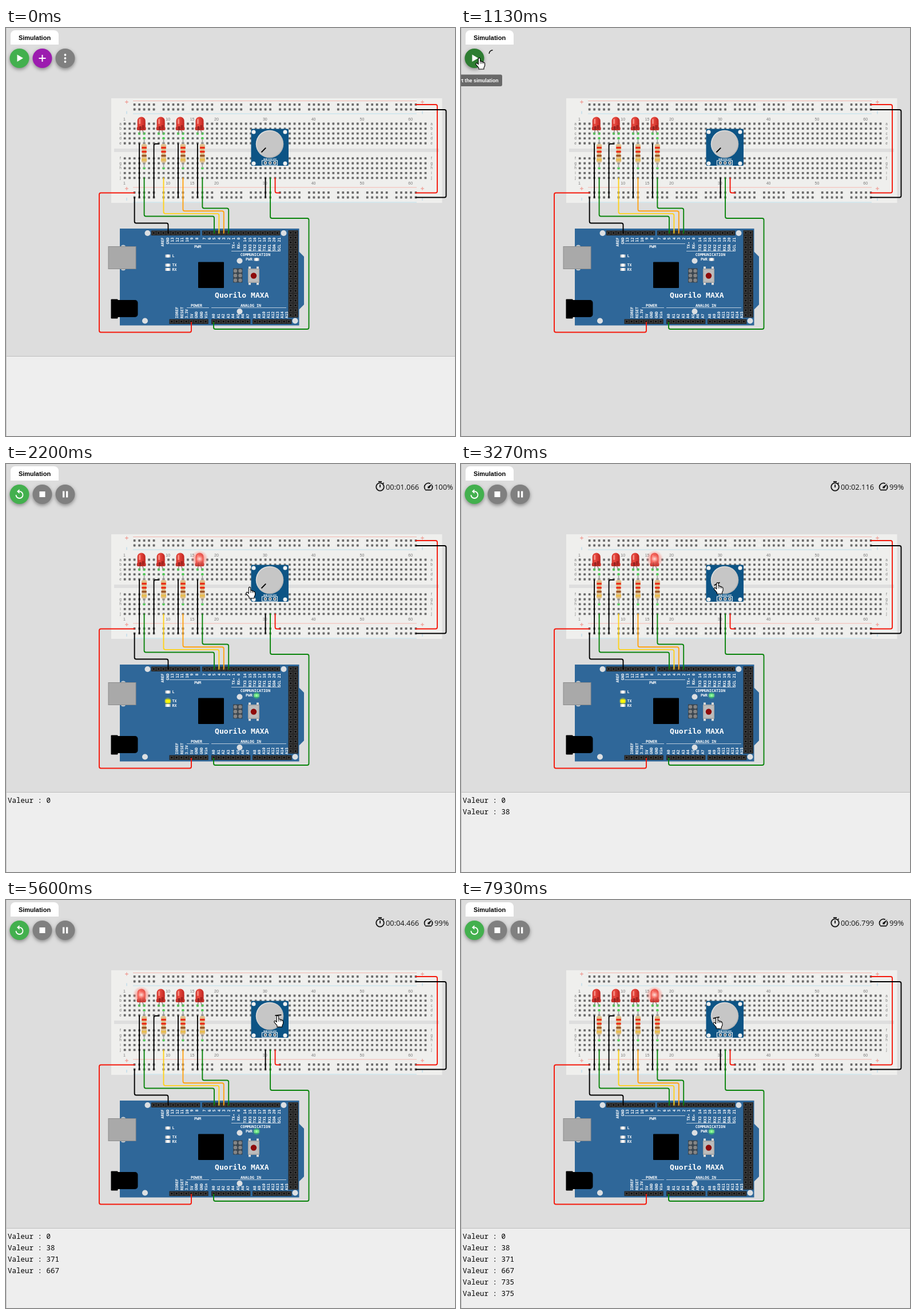
Write an HTML page with a canvas that moves like this. It is 785 by 714 pixels and loops after 8 s.

```html
<!DOCTYPE html>
<html lang="en">
<head>
<meta charset="utf-8">
<title>Circuit simulation</title>
<style>
  html, body { margin: 0; width: 100%; height: 100%; overflow: hidden; background: #ddd; }
  canvas { display: block; }
</style>
</head>
<body>
<canvas id="stage" width="785" height="714"></canvas>
<script>
const LOOP = 8000, FPS = 15;
const CLICK = 1070, LAUNCH = 1133, RUNNING = 1200;
const FIRST_PRINT = 2130, PRINT_EVERY = 1020;
const printed = [0, 38, 371, 667, 735, 375];
const MONO = '"DejaVu Sans Mono", monospace';
const SANS = '"Liberation Sans", sans-serif';
const stage = document.getElementById('stage').getContext('2d');
const backdrop = document.createElement('canvas');
backdrop.width = 785;
backdrop.height = 714;
let c = backdrop.getContext('2d');

// Drawing helpers, all acting on the current context c
function rect(x, y, w, h, fill, r = 0) {
  c.fillStyle = fill;
  c.beginPath();
  c.roundRect(x, y, w, h, r);
  c.fill();
}
function disc(x, y, r, fill) {
  c.fillStyle = fill;
  c.beginPath();
  c.arc(x, y, r, 0, 7);
  c.fill();
}
function poly(points, fill) {
  c.fillStyle = fill;
  c.beginPath();
  for (const [x, y] of points) c.lineTo(x, y);
  c.fill();
}
function line(x1, y1, x2, y2, color, width = 1) {
  c.strokeStyle = color;
  c.lineWidth = width;
  c.beginPath();
  c.moveTo(x1, y1);
  c.lineTo(x2, y2);
  c.stroke();
}
function arc(x, y, r, from, to, color, width) {
  c.strokeStyle = color;
  c.lineWidth = width;
  c.beginPath();
  c.arc(x, y, r, from, to);
  c.stroke();
}
function text(str, x, y, font, fill, align = 'left', turn = 0) {
  c.save();
  c.translate(x, y);
  c.rotate(turn);
  c.font = font;
  c.fillStyle = fill;
  c.textAlign = align;
  c.fillText(str, 0, 0);
  c.restore();
}
function glow(x, y, r, core, rgb) {
  const g = c.createRadialGradient(x, y, 0, x, y, r);
  g.addColorStop(0, core);
  g.addColorStop(0.4, `rgba(${rgb},.7)`);
  g.addColorStop(1, `rgba(${rgb},0)`);
  disc(x, y, r, g);
}
// Wire that starts vertically or horizontally and turns at each given coordinate
function wire(color, axis, x, y, ...turns) {
  const points = turns.map(v => {
    if (axis === 'x') x = v; else y = v;
    axis = axis === 'x' ? 'y' : 'x';
    return [x, y];
  });
  c.lineTo(x, y);
  c.strokeStyle = color;
  c.lineWidth = 1.9;
  c.lineCap = 'round';
  return points;
}
function drawWire(color, axis, x, y, ...turns) {
  c.beginPath();
  c.moveTo(x, y);
  const points = wire(color, axis, x, y, ...turns);
  c.beginPath();
  c.moveTo(x, y);
  points.forEach((p, i) => {
    if (points[i + 1]) c.arcTo(...p, ...points[i + 1], 3);
    else c.lineTo(...p);
  });
  c.stroke();
  c.lineCap = 'butt';
}

const PITCH = 8.48;
const col = n => 199.2 + PITCH * n;
const row = i => (i < 5 ? 167.5 : 185.4) + 8.56 * i;
const railRows = [134, 142.5, 288, 296.5];
const ledColumns = [4, 8, 12, 16];
const ledX = i => col(ledColumns[i]) + 3.6;
const hole = (x, y, fill = '#6c6c6c') => rect(x - 1.9, y - 1.9, 3.8, 3.8, fill, 0.6);

function drawBreadboard() {
  rect(184, 123, 578.5, 183, '#efefed');
  rect(189, 211, 568, 6, '#dedede');
  for (const y of [127.5, 279]) {
    line(222, y, 718, y, '#f5b5ad');
    for (const x of [211, 728]) {
      line(x - 3, y + 2, x + 3, y + 2, '#ef8d83');
      line(x, y - 1, x, y + 5, '#ef8d83');
      line(x, y + 18, x, y + 23, '#a8d4ea');
    }
  }
  for (const y of [150, 305]) line(222, y, 718, y, '#b9dfec');
  for (let n = 1; n <= 63; n++) {
    if (n > 2 && n < 62 && (n - 3) % 6 < 5) railRows.forEach(y => hole(col(n), y));
    for (let i = 0; i < 10; i++) hole(col(n), row(i));
  }
  for (const n of [1, 10, 15, 20, 30, 40, 50, 60])
    for (const y of [161.5, 273.5]) text(n, col(n) - 0.8, y, '7px ' + SANS, '#777', 'center');
  [...'abcdefghij'].forEach((s, i) => {
    for (const x of [200, 744]) text(s, x, row(i) + 2, '6.5px ' + SANS, '#777', 'center');
  });
}

function drawLed(x) {
  line(x - 2.5, 179, x - 3.5, 185, '#8b8580', 1.5);
  line(x + 2, 179, x + 4.5, 185, '#8b8580', 1.5);
  const dome = c.createLinearGradient(x - 8, 0, x + 8, 0);
  dome.addColorStop(0, '#c92d25');
  dome.addColorStop(0.35, '#e94a40');
  dome.addColorStop(1, '#bd221d');
  rect(x - 7, 155.5, 14, 22, dome, [7, 7, 1, 1]);
  rect(x - 8, 173, 16, 6, '#c5302a', 2);
  rect(x - 4.5, 159, 3, 9, 'rgba(255,170,160,.65)', 1.5);
  rect(x - 3.5, 172, 3, 6, '#8e2522');
  rect(x + 1, 170, 4, 7, '#a52520');
}

function drawResistor(x) {
  line(x, 194, x, 245, '#a9a9a4', 1.6);
  rect(x - 3.4, 207, 6.8, 25, '#dfc08e');
  for (const y of [203, 225]) rect(x - 4.6, y, 9.2, 10.5, '#dfc08e', 3);
  ['#e92d18', '#e92d18', '#9b5526', '#e8bd4c'].forEach((band, i) =>
    rect(x - 4.2, 207.8 + 7 * i, 8.4, 3.4, band));
}

function drawPot() {
  rect(428.5, 176.5, 65.5, 64.5, '#0d5485', 2);
  for (const x of [433, 488]) for (const y of [182, 237]) disc(x, y, 3.5, '#f2f2f2');
  const rim = c.createLinearGradient(437, 179, 485, 227);
  rim.addColorStop(0, '#e6e6e6');
  rim.addColorStop(1, '#adadad');
  disc(461, 203, 24.3, rim);
  disc(461, 203, 22.5, '#c6c6c6');
  c.strokeStyle = '#fff';
  c.lineWidth = 1;
  c.strokeRect(447.5, 232, 27, 8);
  ['GND', 'SIG', 'VCC'].forEach((s, i) => {
    const x = 453.5 + 8.2 * i;
    text(s, x, 231, 'bold 4px ' + MONO, '#fff', 'center');
    disc(x, 236, 2.8, '#e5e5e5');
    disc(x, 236, 1.4, '#555');
  });
}

function header(x, y, columns, rows = 1) {
  const w = columns * PITCH + 0.5, h = rows * PITCH;
  rect(x, y, w, h, '#292929');
  for (let i = 0; i < columns; i++)
    for (let j = 0; j < rows; j++) {
      const px = x + (i + 0.5) * PITCH, py = y + (j + 0.5) * PITCH;
      rect(px - 2.6, py - 2.6, 5.2, 5.2, '#484848');
      rect(px - 1.5, py - 1.5, 3, 3, '#0b0b0b');
    }
}
function pinLabels(labels, x, y, align, step = PITCH) {
  labels.split(',').forEach((s, i) =>
    text(s, x + step * i + 2.3, y, 'bold 6.6px ' + MONO, '#fff', align, -Math.PI / 2));
}
function caption(s, x, y, left, right, lineY) {
  text(s, x, y, 'bold 6.7px ' + MONO, '#fff', 'center');
  line(left, lineY, right, lineY, '#b9cbdc');
}
function chipLed(label, x, y, labelX) {
  rect(x - 4.5, y - 2.5, 9, 5, '#cfcfcf');
  rect(x - 2.2, y - 2.5, 4.4, 5, '#fff');
  text(label, labelX, y + 2.4, 'bold 6.6px ' + MONO, '#fff');
}

function drawController() {
  poly([[199, 351], [512.5, 351], [512.5, 391.5], [521, 400], [521, 484], [512.5, 492.5], [512.5, 520.5], [199, 520.5]], '#2f6799');
  for (const y of [384, 420]) disc(205, y, 4.5, '#bcc4ca');
  rect(178.5, 382, 49, 40, '#8c8c8c');
  rect(179.5, 383, 47, 38, '#a9a9a9');
  rect(183.5, 474.5, 12, 34, '#000', 1);
  rect(190, 476, 40.5, 30, '#000', 5);
  for (const [x, y] of [[247.5, 359], [485.5, 359], [243, 512.5], [505.5, 512.5], [408.5, 407.5], [408.5, 496]])
    disc(x, y, 5, '#dcdfe2');

  header(254, 354.5, 10);
  header(343, 354.5, 16);
  header(285.5, 509.5, 8);
  header(359, 509.5, 8);
  header(431, 509.5, 8);
  header(493.5, 354, 2, 18);

  const range = (from, to) => Array.from({ length: Math.abs(to - from) + 1 }, (_, i) => from + i * Math.sign(to - from));
  pinLabels('AREF,GND,' + range(13, 8), 274, 366.5, 'right');
  pinLabels(range(7, 2) + ',TX→ 1,RX← 0', 347, 366.5, 'right');
  pinLabels('TX3 14,RX3 15,TX2 16,RX2 17,TX1 18,RX1 19,SDA 20,SCL 21', 418, 366.5, 'right');
  pinLabels('IOREF,RESET,3.3V,5V,GND,GND,Vin', 299, 508, 'left');
  pinLabels(range(0, 7).map(i => 'A' + i).join(), 363, 508, 'left');
  pinLabels(range(8, 15).map(i => 'A' + i).join(), 435, 508, 'left', 7.95);
  caption('PWM', 335, 384.5, 286, 392, 377.5);
  caption('COMMUNICATION', 436, 399, 394, 480, 390.5);
  caption('POWER', 333, 488, 316, 355, 489.5);
  caption('ANALOG IN', 428, 488, 359, 490, 489.5);

  rect(336, 409.5, 45, 45.5, '#000', 1);
  rect(397, 420.5, 16.5, 25, '#3b4650');
  for (const x of [401, 409.5]) for (const y of [425, 433.3, 441.5]) disc(x, y, 3.2, '#858585');
  for (const x of [426, 440]) rect(x - 2, 417.5, 4, 32, '#ddd');
  rect(423, 421, 20, 25, '#a7a7a7', 1);
  rect(424.5, 423, 17, 21, '#bcbcbc');
  disc(433, 433.5, 5.2, '#8e0b0b');

  chipLed('L', 283, 399, 290.5);
  chipLed('TX', 283, 415, 290.5);
  chipLed('RX', 283, 422.5, 290.5);
  chipLed('PWR', 438, 405, 419);
  text('Quorilo MAXA', 365, 472, 'bold 13.1px ' + MONO, '#fff');
}

function drawWires() {
  const red = '#f5190c', green = '#0a840c', black = '#000';
  const [plusTop, minusTop, plus, minus] = railRows;
  drawWire(red, 'x', col(3), plus + 0.5, 163, 532.5, 324, 515);
  drawWire(black, 'y', col(3), minus, 341.5, 283.5, 359);
  [green, '#ffd21a', '#ffa212', green].forEach((color, i) =>
    drawWire(color, 'y', col(ledColumns[i] + 1), row(9), 329.5 - 4.65 * i, 364 + 8.4 * i, 359));
  drawWire(green, 'y', col(31), row(9), 333, 529.5, 527, 363, 515);
  drawWire(black, 'y', col(30), row(9), minus);
  drawWire(red, 'y', col(32), row(9), plus + 0.5, col(33));
  drawWire(red, 'x', col(61), plusTop, 754, plus + 0.5, col(61));
  drawWire(black, 'x', col(61), minusTop + 0.5, 769.5, minus, col(61));
  for (const n of [4, 12, 16]) drawWire(black, 'y', col(n), row(4) + 1, minus);
  drawWire(black, 'x', col(8), row(4) + 1, col(7), minus);
}

function drawBackdrop() {
  rect(0, 0, 785, 714, '#ddd');
  rect(0, 0, 1, 714, '#c3c3c3');
  rect(8, 4, 84, 25, '#fff', [8, 8, 0, 0]);
  text('Simulation', 50, 21, 'bold 11px ' + SANS, '#000', 'center');
  drawBreadboard();
  drawController();
  drawWires();
  ledColumns.forEach((n, i) => {
    for (const [k, r] of [[n, 2], [n + 1, 2], [n + 1, 3], [n + 1, 8.9 - 1.9]]) hole(col(k), row(r), '#3fd048');
    drawLed(ledX(i));
    drawResistor(col(n + 1));
  });
  drawPot();
}

// Motion
function ease(t, from, to) {
  const u = Math.min(1, Math.max(0, (t - from) / (to - from)));
  return u * u * (3 - 2 * u);
}
const mix = (a, b, u) => a.map((v, i) => v + (b[i] - v) * u);

// The knob is turned up and back at a steady rate with a soft reversal
const knobAngle = t => Math.max(-135, 109 - 0.093 * Math.hypot(t - 5680, 250));
const knobDirection = t => {
  const a = knobAngle(t) * Math.PI / 180;
  return [Math.sin(a), -Math.cos(a)];
};
function cursorAt(t) {
  const [dx, dy] = knobDirection(t);
  const toButton = mix([800, 730], [32, 52], ease(t, 0, 800));
  const toPot = mix(toButton, [426, 215], ease(t, 1330, 2200));
  return mix(toPot, [461 + 14 * dx, 203 + 9.5 * dy], ease(t, 2400, 3000));
}

function button(x, fill) {
  c.save();
  c.shadowColor = 'rgba(0,0,0,.4)';
  c.shadowBlur = 6;
  c.shadowOffsetY = 2.5;
  disc(x, 53, 17, fill);
  c.restore();
}

function drawToolbar(t, hover) {
  button(23.5, hover ? '#2e7d32' : '#43b04e');
  if (t < RUNNING) {
    poly([[19.5, 46.5], [19.5, 59], [30, 52.8]], '#fff');
    if (t >= CLICK) {
      const a = Math.PI + (t - LAUNCH) * 0.006;
      arc(55.5, 45, 6.3, a, a + Math.PI / 2, '#111', 1.6);
      return;
    }
    button(63.5, '#9c1caf');
    rect(57.5, 52, 12, 2, '#fff');
    rect(62.5, 47, 2, 12, '#fff');
    button(103.5, '#808080');
    for (const y of [47, 53, 59]) disc(103.5, y, 1.9, '#fff');
    return;
  }
  arc(23.5, 54, 6, -Math.PI / 2, Math.PI, '#fff', 1.8);
  poly([[23.5, 44], [23.5, 52], [19, 48]], '#fff');
  button(63.5, '#808080');
  rect(58.5, 48, 10, 10, '#fff');
  button(103.5, '#808080');
  for (const x of [99, 105]) rect(x, 47.5, 3.3, 11, '#fff');
}

function drawClock(t) {
  arc(654, 40, 6.8, 0, 7, '#111', 1.8);
  rect(651, 30, 6, 1.8, '#111');
  rect(653.1, 36, 1.8, 5, '#111');
  line(658.8, 34.6, 660.6, 32.8, '#111', 1.6);
  arc(738.5, 40.5, 7, 2.5, 5.2, '#111', 1.8);
  arc(738.5, 40.5, 7, -0.5, 0.65, '#111', 1.8);
  line(733, 45.5, 744, 45.5, '#111', 1.8);
  poly([[745.5, 34], [740.3, 42.5], [737.5, 42.5], [737.2, 40]], '#111');
  // Simulated time and speed waver slightly against real time
  const wave = (from, period) => Math.sin((t - from) / period * 2 * Math.PI) > 0;
  const ms = Math.max(0, Math.floor((t - LAUNCH) * 0.9999 - (wave(2700, 5600) ? 16.6 : 0)));
  const pad = (v, n) => String(v).padStart(n, '0');
  const font = '12.8px "Open Sans", sans-serif';
  text(`00:${pad(Math.floor(ms / 1000), 2)}.${pad(ms % 1000, 3)}`, 664, 44.5, font, '#111');
  text(wave(1567, 2530) ? '100%' : '99%', 749, 44.5, font, '#111');
}

function drawConsole(t) {
  if (t >= CLICK && t < FIRST_PRINT) return;
  rect(0, 574, 785, 140, '#eee');
  rect(0, 574, 785, 1, '#bdbdbd');
  rect(0, 574, 1, 140, '#c3c3c3');
  const count = Math.max(0, Math.floor((t - FIRST_PRINT) / PRINT_EVERY) + 1);
  printed.slice(0, count).forEach((v, i) =>
    text('Valeur : ' + v, 3, 592.5 + 20.1 * i, '12.5px "Noto Sans Mono", monospace', '#000'));
}

function drawCircuitState(t) {
  const [dx, dy] = knobDirection(t);
  line(461 + 9.5 * dx, 203 + 9.5 * dy, 461 + 20.5 * dx, 203 + 20.5 * dy, '#000', 1.8);
  if (t < RUNNING) return;
  const quarter = Math.floor((knobAngle(t) + 135) / 270 * 4);
  glow(ledX(3 - quarter), 166, 15, 'rgba(255,235,230,.95)', '255,120,110');
  glow(438, 405, 7, '#b4ffbc', '60,230,90');
  if (t >= FIRST_PRINT && (t - FIRST_PRINT) % PRINT_EVERY < 145) {
    rect(279, 412, 8, 6, '#f4f000', 1);
    glow(283, 415, 7, '#ffff20', '245,240,0');
  }
}

const hand = new Path2D('M-1.7 1.6Q0-.9 1.7 1.6V6.3Q4 5.6 4.6 7.2Q6.8 6.6 7.2 8.2Q9.6 8 9.6 10.4V14.2L8 17.4V20H-1V17.6L-5.9 11.8Q-6.4 9 -4 9.4L-1.7 11.6Z');
const arrow = new Path2D('M0 0V16L3.7 12.6L6.3 18.4L8.8 17.3L6.2 11.6H11.4Z');
function drawCursor(x, y, pointing) {
  const shape = pointing ? hand : arrow;
  c.save();
  c.translate(x, y);
  c.fillStyle = '#fff';
  c.strokeStyle = '#000';
  c.lineWidth = 1.1;
  c.lineJoin = 'round';
  c.fill(shape);
  c.stroke(shape);
  if (pointing) for (const kx of [1.7, 4.5, 7.1]) line(kx, 7, kx, 10.5, '#000', 0.9);
  c.restore();
}

function render(now) {
  const t = Math.floor((now % LOOP + 4) * FPS / 1000) * 1000 / FPS;
  const [x, y] = cursorAt(t);
  const within = (left, top, right, bottom) => x > left && x < right && y > top && y < bottom;
  const hover = Math.hypot(x - 23.5, y - 53) < 17;
  c.drawImage(backdrop, 0, 0);
  drawToolbar(t, hover);
  drawConsole(t);
  drawCircuitState(t);
  if (t >= RUNNING) drawClock(t);
  if (hover && t >= 930) {
    rect(-60, 81.5, 132, 20.5, '#696969', 3);
    text(t < RUNNING ? 'Start the simulation' : 'Restart the simulation', 65.5, 94.5, 'bold 8.7px ' + SANS, '#fff', 'right');
  }
  drawCursor(x, y, hover || within(184, 123, 762, 306) || within(199, 351, 521, 520));
  requestAnimationFrame(() => render(performance.now() - start));
}

drawBackdrop();
c = stage;
const start = performance.now();
render(0);
</script>
</body>
</html>
```
